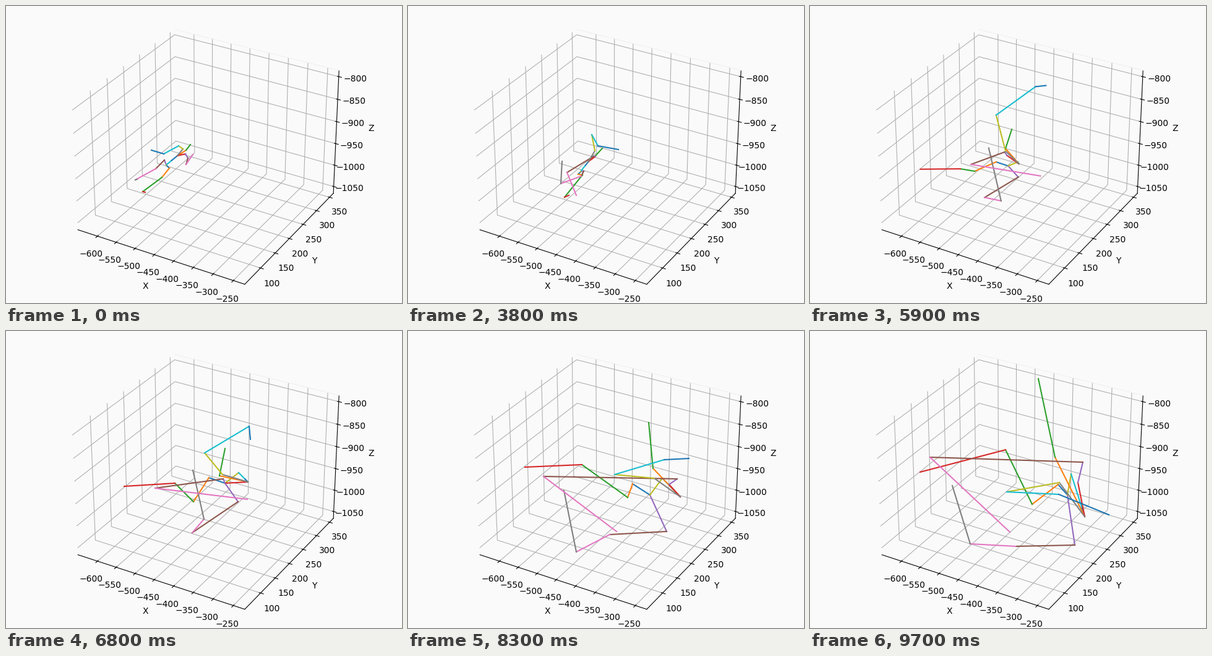
These frames come from a looping animation (640x480 px, 9.8 s). A matplotlib script:

```python
import numpy as np
import matplotlib.pyplot as plt
from matplotlib.animation import FuncAnimation
from matplotlib.lines import Line2D
from matplotlib.transforms import Affine2D

W, H, DPI = 640, 480, 100
FRAMES, STEP = 98, 100
BACK = "#fafafa"
NOW = np.arange(FRAMES) * STEP

# A few key poses in stage pixels; the rest follows from easing and swings.
KEYS = np.array([0, 3800, 5000, 6800, 8300, 9700])
CROUCH_END = KEYS[1]
HOP = 7

# Pelvis, waist, collar, neck, head
SPINE = [
    [(259, 257), (260, 256), (277, 242), (291, 233), (298, 224)],
    [(279, 268), (280, 266), (292, 251), (303, 242), (314, 230)],
    [(292, 271), (299, 275), (298, 266), (300, 227), (309, 208)],
    [(354, 246), (376, 229), (391, 244), (345, 234), (354, 190)],
    [(391, 265), (411, 238), (440, 268), (396, 222), (389, 148)],
    [(416, 265), (422, 231), (444, 300), (396, 204), (369, 77)],
]
# Hip, knee, ankle, foot
LEG_A = [
    [(264, 262), (252, 277), (221, 300), (225, 301)],
    [(275, 272), (282, 273), (253, 309), (260, 306)],
    [(281, 269), (254, 258), (238, 281), (202, 277)],
    [(328, 237), (303, 276), (273, 246), (191, 251)],
    [(363, 247), (355, 269), (281, 216), (189, 220)],
    [(401, 248), (359, 280), (316, 192), (178, 228)],
]
LEG_B = [
    [(256, 249), (242, 263), (209, 281), (212, 280)],
    [(284, 267), (280, 275), (247, 287), (249, 251)],
    [(303, 277), (271, 288), (287, 326), (268, 238)],
    [(375, 276), (301, 326), (320, 304), (302, 225)],
    [(418, 324), (326, 329), (272, 357), (252, 258)],
    [(428, 346), (332, 348), (259, 344), (230, 250)],
]
# Shoulder, elbow, wrist, hand
ARM_A = [
    [(290, 239), (294, 246), (291, 256), (302, 240)],
    [(303, 243), (300, 243), (257, 269), (272, 306)],
    [(299, 238), (296, 233), (272, 258), (338, 281)],
    [(354, 246), (351, 239), (241, 254), (390, 272)],
    [(422, 248), (435, 239), (219, 235), (337, 324)],
    [(433, 245), (441, 212), (194, 204), (323, 325)],
]
ARM_B = [
    [(286, 231), (279, 226), (255, 239), (235, 233)],
    [(302, 234), (297, 208), (307, 226), (340, 232)],
    [(296, 237), (286, 189), (333, 175), (369, 173)],
    [(350, 232), (321, 197), (393, 154), (395, 175)],
    [(398, 238), (334, 232), (414, 208), (454, 206)],
    [(403, 245), (318, 260), (402, 264), (483, 297)],
]


def arc(start, end):
    """Half a sine wave between two times, zero outside."""
    return np.sin(np.pi * np.clip((NOW - start) / (end - start), 0, 1))


def glide(poses):
    """Monotone cubic easing through the key poses, one row per frame."""
    p = np.array(poses, float)
    gap = np.diff(KEYS)[:, None, None]
    slope = np.diff(p, axis=0) / gap
    a, b = slope[:-1], slope[1:]
    same = a * b > 0
    inner = np.where(same, 2 * a * b / np.where(same, a + b, 1), 0)
    m = np.concatenate([slope[:1], inner, slope[-1:]])

    i = np.clip(np.searchsorted(KEYS, NOW, side="right") - 1, 0, len(KEYS) - 2)
    h = gap[i]
    s = (NOW - KEYS[i])[:, None, None] / h
    path = ((1 + 2 * s) * (1 - s) ** 2 * p[i] + s * (1 - s) ** 2 * h * m[i]
            + s * s * (3 - 2 * s) * p[i + 1] + s * s * (s - 1) * h * m[i + 1])
    path[..., 1] -= HOP * arc(0, CROUCH_END)[:, None]
    return path


def limb(root, poses, *swings):
    """Chain from root; each swing (start, end, dx, dy) grows towards the tip."""
    path = glide(poses)
    reach = np.linspace(0, 1, path.shape[1])
    for start, end, dx, dy in swings:
        path += arc(start, end)[:, None, None] * reach[:, None] * np.array([dx, dy])
    return np.concatenate([root[:, None], path], axis=1)


spine = glide(SPINE)
pelvis, waist, collar = spine[:, 0], spine[:, 1], spine[:, 2]
blend = np.linspace(0.45, 0.8, FRAMES)[:, None]
chest = waist + (collar - waist) * blend

chains = [
    limb(pelvis, LEG_A, (0, CROUCH_END, -14, 4), (5000, 6800, -16, 0), (8300, 9700, -12, 0)),
    limb(pelvis, LEG_B, (0, CROUCH_END, -12, 8)),
    np.insert(spine, 2, chest, axis=1),
    limb(collar, ARM_A, (0, CROUCH_END, -26, 20)),
    limb(collar, ARM_B, (0, CROUCH_END, 12, -10), (5000, 6800, 0, -45)),
]
bones = [chain[:, k:k + 2] for chain in chains for k in range(chain.shape[1] - 1)]

fig = plt.figure(figsize=(W / DPI, H / DPI), dpi=DPI, facecolor=BACK)
ax = fig.add_axes([0, 0, 1, 1], projection="3d", facecolor=BACK)
ax.view_init(elev=30, azim=-60)
ax.set(xlim=(-652.9, -221.9), ylim=(47.3, 365.1), zlim=(-1066, -786.9),
       xlabel="X", ylabel="Y", zlabel="Z",
       xticks=np.arange(-600, -249, 50), yticks=np.arange(100, 351, 50),
       zticks=np.arange(-1050, -799, 50))
for axis in (ax.xaxis, ax.yaxis, ax.zaxis):
    axis.set_pane_color((1, 1, 1, 0))

stage = Affine2D().scale(1 / W, -1 / H).translate(0, 1) + fig.transFigure


def add_line(xs, ys, **style):
    return fig.add_artist(Line2D(xs, ys, transform=stage, **style))


# Faint upper pane edge
add_line((273, 538), (38, 104), color="#f0f0f0", lw=0.8)

lines = [add_line([], [], color=f"C{k % 10}", lw=1.5) for k in range(len(bones))]


def update(frame):
    for line, bone in zip(lines, bones):
        line.set_data(bone[frame, :, 0], bone[frame, :, 1])
    return lines


anim = FuncAnimation(fig, update, frames=FRAMES, interval=STEP, repeat=True,
                     repeat_delay=0, blit=False)
plt.show()
```
